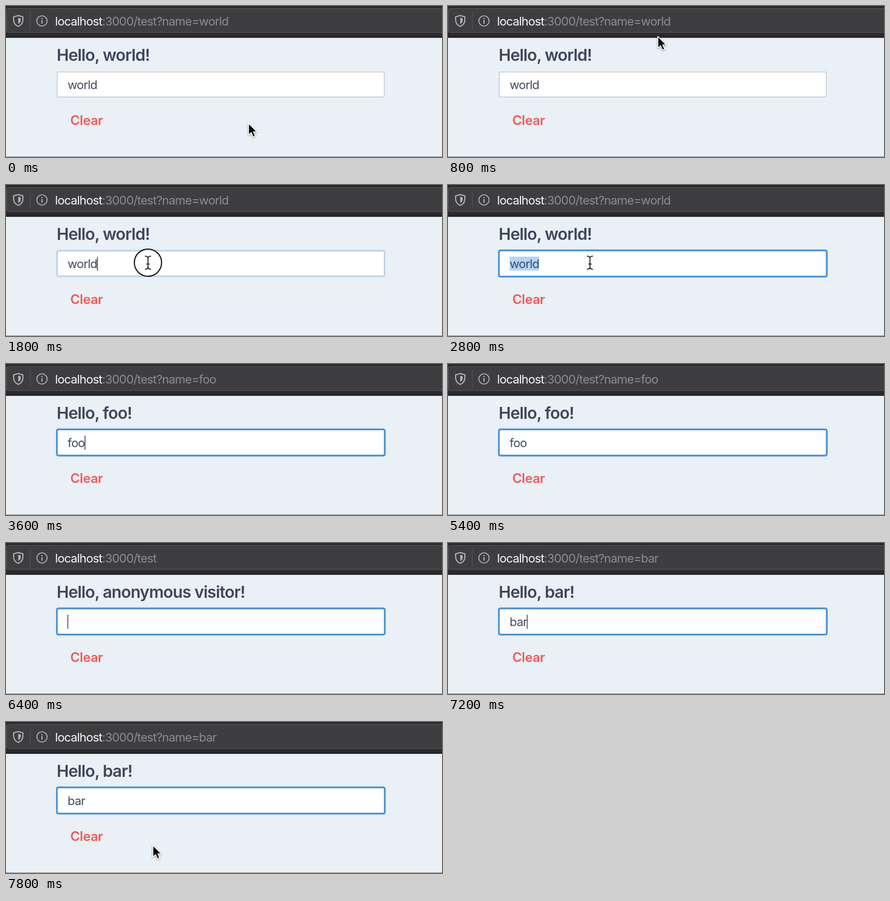
An HTML page for the animation above (8 s loop, 800 by 278 pixels).

```html
<!DOCTYPE html>
<html lang="en">
<head>
<meta charset="utf-8">
<title>Query parameter demo</title>
<style>
  html, body { margin: 0; width: 100%; height: 100%; overflow: hidden; background: #e9f0f6; }
  svg { display: block; width: 800px; height: 278px; }
  text { font-family: Inter, "Open Sans", sans-serif; font-optical-sizing: none; white-space: pre; }
  #url { font-size: 22px; letter-spacing: -.85px; fill: #8d8d90; }
  #url .host { fill: #f8f8fa; }
  #greeting { font-size: 30px; font-weight: 600; letter-spacing: -.88px; fill: #3e465a; }
  #value { font-size: 22px; letter-spacing: -.8px; fill: #414a5c; }
  #clear { font-size: 24px; font-weight: 600; letter-spacing: -.4px; fill: #ef5a58; }
</style>
</head>
<body>
<svg viewBox="0 0 800 278">
  <rect width="800" height="278" fill="#e9f0f6"/>
  <rect width="800" height="58" fill="#2a2a2d"/>
  <rect y="57" width="800" height="1.5" fill="#0c0c0d"/>
  <rect x=".5" y="4.5" width="820" height="44.5" rx="4" fill="#3e3e41" stroke="#58585b"/>
  <path d="M44.5 11V43" stroke="#59595c"/>
  <g fill="none" stroke="#b5b5b8" stroke-width="2">
    <path d="M22.5 17.5L31 20V25C31 31.500 28 35.500 22.500 37.500C17 35.500 14 31.500 14 25V20Z"/>
    <path d="M22.500 21.500L27 23V25.500C27 29.500 25.500 31.500 22.500 33Z" fill="#b5b5b8" stroke="none"/>
    <circle cx="66" cy="27.500" r="9.500" stroke-width="1.700"/>
    <path d="M66 26V32.500M66 22V24.300"/>
  </g>
  <text id="url" x="90" y="35.500"><tspan class="host">localhost</tspan><tspan id="path"></tspan></text>

  <text id="greeting" x="93" y="101"></text>
  <rect x="94" y="121.500" width="600" height="46" rx="2.500" fill="#fff" stroke="#bfc9d8" stroke-width="1.500"/>
  <rect id="ring" x="93.300" y="120.300" width="601.800" height="48.400" rx="3" fill="none" stroke="#4390d9" stroke-width="3"/>
  <rect id="selection" x="113" y="132" height="25.500" fill="#b0d4fc"/>
  <text id="value" x="113" y="153"></text>
  <rect id="caret" y="132" width="1.500" height="26" fill="#3a4254"/>
  <text id="clear" x="118" y="219">Clear</text>
  <rect y="277" width="800" height="1" fill="#85888c"/>

  <circle id="press" cx="260.500" cy="143" r="25" fill="#fff" fill-opacity=".5" stroke="#0b0b0b" stroke-width="2"/>
  <g id="pointer" stroke-linejoin="round">
    <path id="arrow" d="M0 0V21.500L5 17L8.500 25L12.500 23.300L9 15.500H15.500Z" fill="#000" stroke="#fff" stroke-width="1.600" style="filter:drop-shadow(0 1.500px 1.500px rgba(0,0,0,.4))"/>
    <g id="beam" fill="none" stroke-linecap="round">
      <path id="beamShape" d="M-5 -12Q0 -12 0 -8Q0 -12 5 -12M0 -8V8M-5 12Q0 12 0 8Q0 12 5 12M-2.500 2.500H2.500" stroke="#fff" stroke-width="4"/>
      <use href="#beamShape" style="display:none"/>
      <path d="M-5 -12Q0 -12 0 -8Q0 -12 5 -12M0 -8V8M-5 12Q0 12 0 8Q0 12 5 12M-2.500 2.500H2.500" stroke="#111" stroke-width="1.700"/>
    </g>
  </g>
</svg>
<script>
const LOOP = 8000, STEP = 200;
const $ = id => document.getElementById(id);
const show = (id, on) => { $(id).style.display = on ? "" : "none"; };
const between = (t, from, to) => t >= from && t < to;

// [time, field text]
const edits = [
  [0, "world"], [3200, "f"], [3400, "fo"], [3600, "foo"],
  [5600, "fo"], [5800, "f"], [6000, ""],
  [6800, "b"], [7000, "ba"], [7200, "bar"]
];
// [time, x, y]
const route = [
  [0, 445, 216], [800, 385, 56], [1000, 385, 56], [1600, 260.5, 143],
  [7600, 260.5, 143], [7800, 269.5, 227]
];
const FOCUS = 1800, SELECT = 2600;

function pointerAt(t) {
  const next = route.findIndex(p => p[0] > t);
  if (next < 0) return route.at(-1).slice(1);
  const [a, b] = [route[next - 1], route[next]];
  const u = (t - a[0]) / (b[0] - a[0]);
  const ease = u * u * (3 - 2 * u);
  return [1, 2].map(i => a[i] + (b[i] - a[i]) * ease);
}

function draw(t) {
  const [editTime, text] = edits.filter(e => e[0] <= t).at(-1);
  $("value").textContent = text;
  $("path").textContent = ":3000/test" + (text && "?name=" + text);
  $("greeting").textContent = `Hello, ${text || "anonymous visitor"}!`;

  const width = text ? $("value").getComputedTextLength() : 0;
  const selected = between(t, SELECT, edits[1][0]);
  const caretOn = (t - Math.max(FOCUS, editTime)) % 1000 < 500;
  $("selection").setAttribute("width", width);
  $("caret").setAttribute("x", 112.7 + width);
  show("selection", selected);
  show("caret", t >= FOCUS && !selected && caretOn);
  $("ring").style.opacity = t < FOCUS ? 0 : t < FOCUS + STEP ? .15 : 1;

  const [x, y] = pointerAt(t);
  const inField = between(x, 94, 694) && between(y, 121, 168);
  $("pointer").setAttribute("transform", `translate(${x} ${y})`);
  show("pointer", !between(t, edits[1][0], 7600));
  show("arrow", !inField);
  show("beam", inField);
  show("press", between(t, FOCUS, FOCUS + STEP));
}

function tick(now) {
  draw(Math.floor(now % LOOP / STEP) * STEP);
  requestAnimationFrame(tick);
}
draw(0);
requestAnimationFrame(tick);
</script>
</body>
</html>
```
